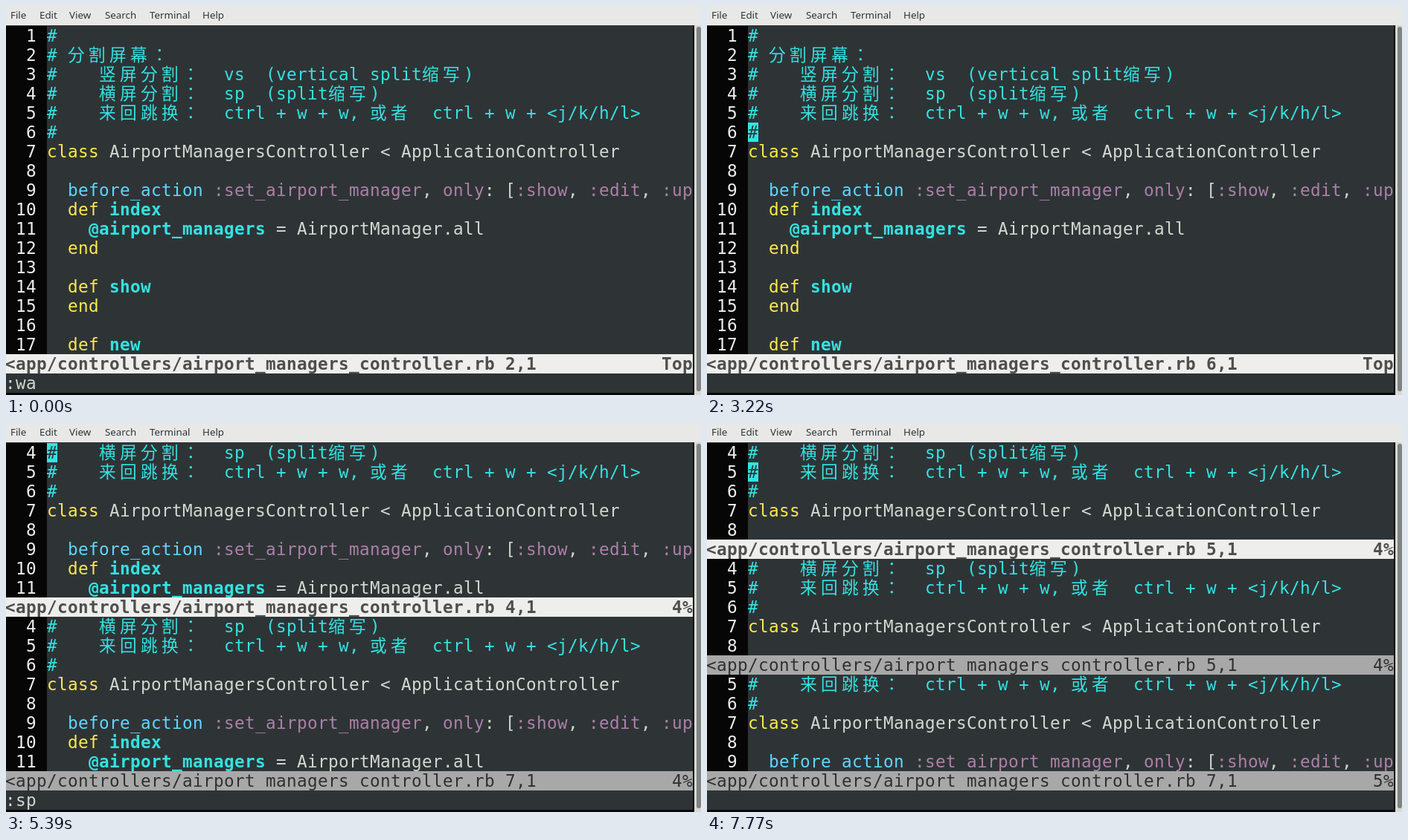
These frames come from a looping animation (934x524 px, 8 s). An HTML page:

```html
<!DOCTYPE html>
<html lang="en">
<head>
<meta charset="utf-8">
<title>Split windows in a terminal editor</title>
<style>
  html, body { margin: 0; width: 100%; height: 100%; overflow: hidden; background: #080808; }
  #menu { position: absolute; left: 0; top: 0; width: 934px; height: 26px; background: #e8e8e7;
    font: 13.333px/24px "Noto Sans", "Open Sans", sans-serif; color: #2e3436; }
  #menu span { position: absolute; top: 0; white-space: pre; }
  #bar { position: absolute; left: 925px; top: 26px; width: 9px; height: 498px; background: #d8d8d6; }
  #bar i { position: absolute; left: 3px; top: 2px; width: 6px; height: 491px; border-radius: 3px; background: #7f8382; }
  #term { position: absolute; left: 0; top: 26px; width: 923px; height: 495px; overflow: hidden; background: #2e3436; }
  #screen { position: absolute; left: -1px; top: 1px; color: #d3d7cf; text-spacing-trim: space-all;
    font: 22.667px/26px "DejaVu Sans Mono", "Noto Sans CJK JP", "Noto Sans CJK SC", monospace; }
  #screen span, #screen i { position: absolute; height: 26px; white-space: pre; }
  .num { color: #eeeeec; }
  .c { color: #34e2e2; }
  .y { color: #fce94f; }
  .f { color: #34e2e2; font-weight: bold; }
  .b { color: #5fd7ff; }
  .s { color: #ad7fa8; }
  .dark { color: #2e3436; }
  .on { color: #4e4e4c; font-weight: bold; }
  .off { color: #303030; }
  .mode { font-weight: bold; }
</style>
</head>
<body>
<div id="menu">
  <span style="left:6px">File</span><span style="left:45px">Edit</span><span style="left:85px">View</span>
  <span style="left:133px">Search</span><span style="left:193px">Terminal</span><span style="left:264px">Help</span>
</div>
<div id="term"><div id="screen"></div></div>
<div id="bar"><i></i></div>
<script>
const CELL = 14, ROW = 26, COLS = 66, GUTTER = 4, TOTAL = 73, LOOP = 8000;
const PATH = '<app/controllers/airport_managers_controller.rb ';
const screen = document.getElementById('screen');

// Each line is a list of [class, text] runs.
const note = text => [['c', text]];
const def = name => [['y', '  def '], ['f', name]];
const end = [['y', '  end']];
const code = [
  note('#'),
  note('# 分割屏幕：'),
  note('#    竖屏分割：  vs  (vertical split缩写)'),
  note('#    横屏分割：  sp  (split缩写)'),
  note('#    来回跳换：  ctrl + w + w, 或者  ctrl + w + <j/k/h/l>'),
  note('#'),
  [['y', 'class'], ['', ' AirportManagersController < ApplicationController']],
  [],
  [['b', '  before_action '], ['s', ':set_airport_manager'], ['', ', '], ['s', 'only'], ['', ': ['],
   ['s', ':show'], ['', ', '], ['s', ':edit'], ['', ', '], ['s', ':up']],
  def('index'),
  [['f', '    @airport_managers'], ['', ' = AirportManager.all']],
  end,
  [],
  def('show'),
  end,
  [],
  def('new')
];

const win = (top, cur, rows) => ({ top, cur, rows });
const full = cur => [win(1, cur, 17)];
const pair = (top, cur) => [win(top, cur, 8), win(4, 7, 8)];

// Every step changes only the listed parts of the state.
const steps = [
  [0, { wins: full(2), cursor: false, sel: 0, cmd: ':wa', typing: false }],
  [420, { cursor: true }],
  [770, { wins: full(3) }],
  [1260, { sel: 3, cmd: '-- VISUAL LINE --' }],
  [2100, { wins: full(4) }],
  [2660, { wins: full(5) }],
  [3080, { sel: 0, cmd: '' }],
  [3220, { wins: full(6) }],
  [3360, { wins: full(7) }],
  [3780, { cmd: ':', typing: true }],
  [4060, { cmd: ':s' }],
  [4200, { cmd: ':sp' }],
  [4480, { wins: pair(4, 7), typing: false }],
  [5040, { wins: pair(4, 6) }],
  [5250, { wins: pair(4, 5) }],
  [5390, { wins: pair(4, 4) }],
  [5600, { wins: pair(3, 3), cmd: '' }],
  [5950, { wins: pair(3, 4) }],
  [6160, { wins: pair(3, 5) }],
  [6510, { cmd: ':', typing: true }],
  [7280, { cmd: ':s' }],
  [7350, { cmd: ':' }],
  [7420, { cmd: ':s' }],
  [7560, { cmd: ':sp' }],
  [7770, { wins: [win(4, 5, 5), win(4, 5, 5), win(5, 7, 5)], cmd: '', typing: false }]
];

const WIDE = /[\u2e80-\uffef]/;
const cells = text => [...text].reduce((n, ch) => n + (WIDE.test(ch) ? 2 : 1), 0);

function add(tag, row, col, cls) {
  const el = document.createElement(tag);
  el.className = cls || '';
  el.style.left = col * CELL + 'px';
  el.style.top = row * ROW + 'px';
  return screen.appendChild(el);
}

function fill(row, col, width, color) {
  const el = add('i', row, col);
  el.style.width = width * CELL + 'px';
  el.style.background = color;
}

// Letter spacing that fits the font's own advance to the cell grid.
function spacing(ch, width) {
  const probe = add('span', 0, 0);
  probe.textContent = ch.repeat(40);
  const advance = probe.getBoundingClientRect().width / 40;
  probe.remove();
  return width - advance + 'px';
}
const narrowGap = spacing('m', CELL), wideGap = spacing('分', 2 * CELL);

function put(row, col, text, cls) {
  for (const run of text.match(/[\u2e80-\uffef]+|[^\u2e80-\uffef]+/g) || []) {
    const el = add('span', row, col, cls);
    el.style.letterSpacing = WIDE.test(run) ? wideGap : narrowGap;
    el.textContent = run;
    col += cells(run);
  }
  return col;
}

function place(w) {
  const above = w.top - 1, below = TOTAL - above - w.rows;
  return above ? Math.floor(above * 100 / (above + below)) + '%' : 'Top';
}

function drawWindow(w, row, active, state) {
  for (let n = w.top; n < w.top + w.rows; n++, row++) {
    const line = code[n - 1];
    fill(row, 0, GUTTER, '#060606');
    put(row, 0, String(n).padStart(3), 'num');
    if (active && state.sel && n >= state.sel && n <= w.cur) {
      fill(row, GUTTER, cells(line.map(r => r[1]).join('')) + 1, '#626262');
    }
    let col = GUTTER;
    for (const [cls, text] of line) col = put(row, col, text, cls);
    if (active && state.cursor && !state.typing && n === w.cur) {
      fill(row, GUTTER, 1, line[0][0] === 'y' ? '#fce94f' : '#34e2e2');
      put(row, GUTTER, line[0][1][0], 'dark');
    }
  }
  const cls = active ? 'on' : 'off', mark = place(w);
  fill(row, 0, COLS, active ? '#eeeeec' : '#a8a8a8');
  put(row, 0, PATH + w.cur + ',1', cls);
  put(row, COLS - mark.length, mark, cls);
  return row + 1;
}

function draw(state) {
  screen.textContent = '';
  let row = 0;
  state.wins.forEach((w, i) => { row = drawWindow(w, row, i === 0, state); });
  put(row, 0, state.cmd, state.cmd[0] === '-' ? 'mode' : '');
  if (state.typing) fill(row, state.cmd.length, 1, '#d3d7cf');
}

let shown = -1;
function tick() {
  const t = performance.now() % LOOP;
  const count = steps.filter(([at]) => at <= t).length;
  if (count !== shown) {
    shown = count;
    draw(Object.assign({}, ...steps.slice(0, count).map(s => s[1])));
  }
  requestAnimationFrame(tick);
}
tick();
</script>
</body>
</html>
```
